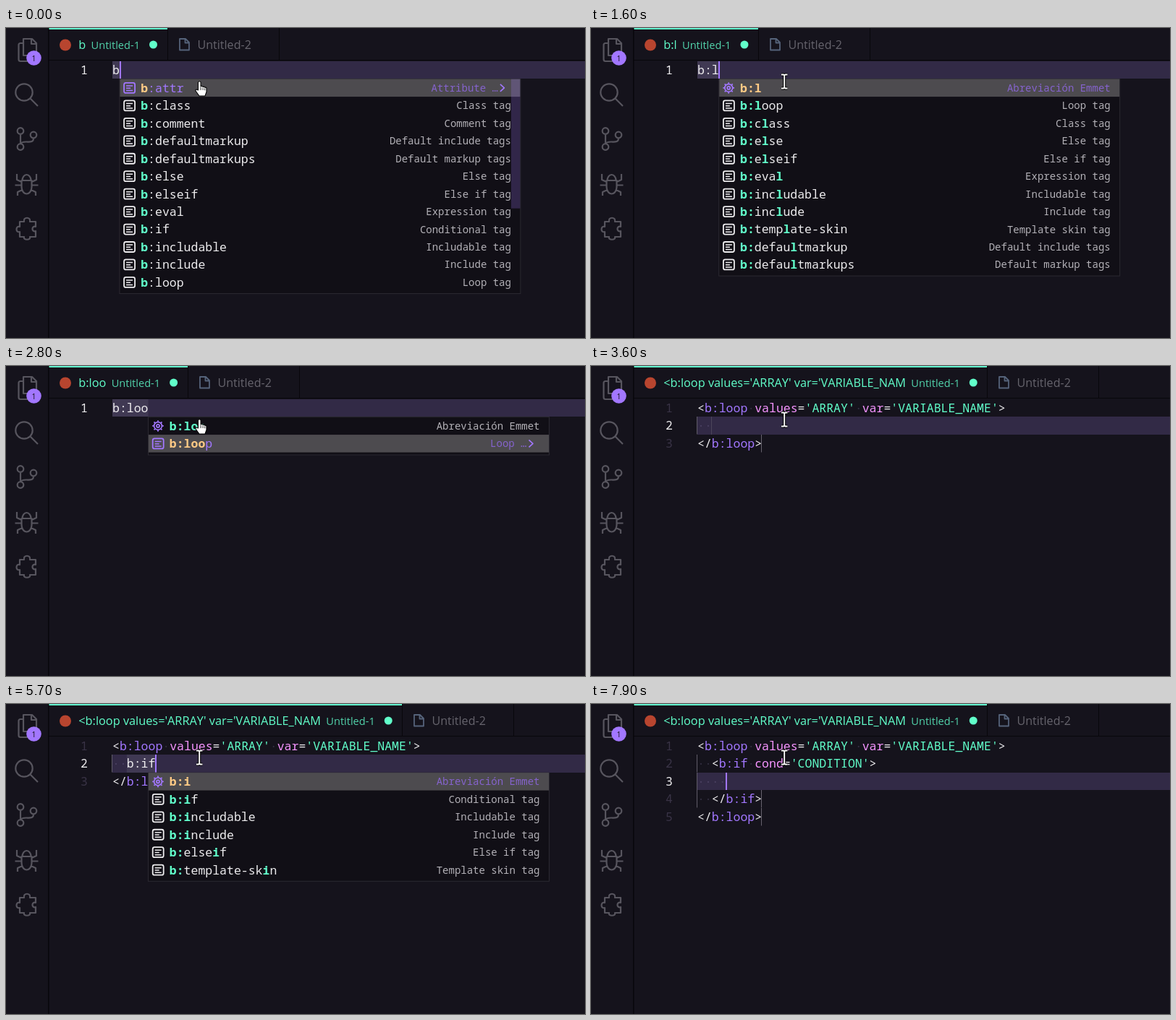
An HTML page with a canvas for the animation above (8000 ms loop, 800x429 px).

```html
<!DOCTYPE html>
<html lang="en">
<head>
<meta charset="utf-8">
<title>Tag completion</title>
<style>
html, body { margin: 0; width: 100%; height: 100%; overflow: hidden; background: #15131c; }
canvas { display: block; width: 800px; height: 429px; }
</style>
</head>
<body>
<canvas id="stage" width="800" height="429"></canvas>
<script>
const ctx = document.getElementById('stage').getContext('2d');
const LOOP = 8000, LEFT = 147, TOP = 45.7, LINE = 24.45, CHAR = 9.9;
const C = {
  bg: '#15131c', line: '#322a46', popup: '#110f16', pick: '#4d4b4f',
  white: '#edecee', green: '#61ffca', purple: '#a277ff', orange: '#ffca85',
  pink: '#f694ff', icon: '#57555e', label: '#b3b1b7', dim: '#393346'
};
const MONO = '"Noto Sans Mono", "DejaVu Sans Mono", monospace';
const SANS = '"Open Sans", "Noto Sans", sans-serif';
const CODE = '500 16.5px ' + MONO, BOLD = 'bold 16.5px ' + MONO, SMALL = '500 14px ' + MONO;

const LABELS = {
  attr: 'Attribute tag', class: 'Class tag', comment: 'Comment tag',
  defaultmarkup: 'Default include tags', defaultmarkups: 'Default markup tags',
  else: 'Else tag', elseif: 'Else if tag', eval: 'Expression tag',
  if: 'Conditional tag', includable: 'Includable tag', include: 'Include tag',
  loop: 'Loop tag', 'template-skin': 'Template skin tag'
};
const MATCHES = {
  'b': 'attr class comment defaultmarkup defaultmarkups else elseif eval if includable include loop',
  'b:l': 'loop class else elseif eval includable include template-skin defaultmarkup defaultmarkups',
  'b:lo': 'loop', 'b:loo': 'loop',
  'b:i': 'if includable include elseif template-skin',
  'b:if': 'if elseif'
};

const OPEN = "<b:loop values='ARRAY' var='VARIABLE_NAME'>", CLOSE = '</b:loop>';
const inLoop = (...body) => [OPEN, ...body, CLOSE];
const nested = inLoop("  <b:if cond='CONDITION'>", '    ', '  </b:if>');

// Each step overrides part of the state; "key" restarts the caret blink.
const STEPS = [
  [0, { lines: ['b'], row: 0, col: 1, title: 'b', pop: 'b', popCol: 1, sel: 0, more: 1, hand: 1, mark: null, key: 1 }],
  [500, { lines: ['b:'], col: 2, pop: '', hand: 0, key: 1 }],
  [600, { title: 'b:' }],
  [1400, { lines: ['b:l'], col: 3, key: 1 }],
  [1500, { title: 'b:l', pop: 'b:l', popCol: 3, more: 0 }],
  [1700, { lines: ['b:lo'], col: 4, key: 1 }],
  [1800, { title: 'b:lo', pop: 'b:lo', popCol: 4 }],
  [1900, { lines: ['b:loo'], col: 5, key: 1 }],
  [2000, { title: 'b:loo', pop: 'b:loo', popCol: 5, more: 1, hand: 1 }],
  [2600, { sel: 1 }],
  [2900, { lines: inLoop('  '), col: 21, pop: '', hand: 0, mark: [16, 21], key: 1 }],
  [3000, { col: 41, mark: [28, 41], key: 1 }],
  [3100, { title: OPEN.slice(0, 40), row: 1, col: 2, mark: null, key: 1 }],
  [3900, { key: 1 }],
  [4300, { lines: inLoop('  b'), col: 3 }],
  [4400, { key: 1 }],
  [4500, { pop: 'b', popCol: 3, sel: -1, more: 0 }],
  [5300, { lines: inLoop('  b:'), col: 4, pop: '', key: 1 }],
  [5500, { lines: inLoop('  b:i'), col: 5, key: 1 }],
  [5600, { pop: 'b:i', popCol: 5, sel: 0 }],
  [5700, { lines: inLoop('  b:if'), col: 6, key: 1 }],
  [5800, { pop: 'b:if', popCol: 6 }],
  [7200, { sel: 1, more: 1 }],
  [7600, { lines: nested, col: 23, pop: '', mark: [14, 23], key: 1 }],
  [7800, { row: 2, col: 4, mark: null, key: 1 }]
];

function stateAt(t) {
  const s = {};
  for (const [at, change] of STEPS) {
    if (at > t) break;
    Object.assign(s, change);
    if (change.key) s.keyTime = at;
  }
  s.caret = Math.floor((t - s.keyTime) / 500) % 2 === 0;
  return s;
}

const lineTop = row => Math.round(TOP + row * LINE);

function rect(x, y, w, h, color) {
  ctx.fillStyle = color;
  ctx.fillRect(x, y, w, h);
}

function text(str, x, y, color, font, align = 'left') {
  ctx.font = font;
  ctx.fillStyle = color;
  ctx.textAlign = align;
  ctx.fillText(str, x, y);
  return ctx.measureText(str).width;
}

function disc(x, y, r, color) {
  ctx.fillStyle = color;
  ctx.beginPath();
  ctx.arc(x, y, r, 0, 7);
  ctx.fill();
}

function stroke(d, color, width, x = 0, y = 0) {
  ctx.save();
  ctx.translate(x, y);
  ctx.strokeStyle = color;
  ctx.lineWidth = width;
  ctx.lineJoin = 'round';
  ctx.stroke(new Path2D(d));
  ctx.restore();
}

const ring = (x, y, r) => `M${x + r} ${y}a${r} ${r} 0 1 0 ${-2 * r} 0a${r} ${r} 0 1 0 ${2 * r} 0`;

const SIDE_ICONS = [
  'M24 15h12l6 6v17h-18zM35 15v7h7M24 21h-4q-2.5 0-2.5 2.5v20q0 2.5 2.5 2.5h13q2.5 0 2.5-2.5v-5.5',
  ring(25, 89, 11.7) + 'M33.5 97.5l10.5 10.5',
  ring(20, 142.5, 4.3) + ring(38, 148, 4.3) + ring(20, 164.5, 4.3) +
    'M20 147v13M38 152.5c0 6-5 5-10 5q-7 0-8 3',
  'M21.5 211h14v9a7 9.5 0 0 1-14 0zM22.5 211a6 8 0 0 1 12 0' +
    'M21.5 213l-6.5-3v-8M35.5 213l6.5-3v-8M21.5 217.5h-9M35.5 217.5h9M22.5 224l-6.5 3v5M34.5 224l6.5 3v5',
  'M19 268h6c-2-7 10-7 8 0h8v7c-6-2-6 8 0 6v8h-8c2 5-10 5-8 0h-6v-7c-6 2-6-9 0-7z'
];

function drawSidebar() {
  rect(58, 0, 1.5, 429, '#08070b');
  SIDE_ICONS.forEach(d => stroke(d, C.icon, 2.2));
  disc(38.5, 41.5, 10.3, C.purple);
  text('1', 38.5, 45.5, C.bg, '10.5px ' + SANS, 'center');
}

function drawTabs(title) {
  const font = '500 16.3px ' + SANS, y = 28.5;
  const nameX = 100.3 + text(title, 100.3, y, C.green, font) + 7.3;
  const nameW = text('Untitled-1', nameX, y, '#52d3ab', '14.6px ' + SANS);
  const dot = nameX + nameW + 18.5, end = Math.round(dot + 19);
  disc(82, 23.5, 8, '#b8452f');
  disc(dot, 23, 5.5, C.green);
  rect(59, 0, end - 59, 2, C.green);
  rect(end, 0, 1, 44, '#08070b');
  rect(59, 44, 741, 1, '#08070b');
  rect(end + 154, 0, 1, 44, '#08070b');
  stroke('M1 1h8l5 5v10.5h-13zM8.5 1v5.5h5.5', '#55637a', 1.8, end + 16, 14);
  text('Untitled-2', end + 41.5, y, '#66646d', '16.1px ' + SANS);
}

function tokenColor(token) {
  if (token[0] === "'") return C.green;
  if (token.startsWith('b:')) return C.purple;
  return /\w/.test(token) ? C.pink : C.white;
}

function drawLine(str, y) {
  const markup = str.includes('<');
  let x = LEFT;
  for (const token of str.match(/'[^']*'|b:\w*|\w+|\s+|[^\s\w']/g) || []) {
    const space = token[0] === ' ';
    const color = space ? 'rgba(162,150,200,.22)' : markup ? tokenColor(token) : C.white;
    x += text(space ? '·'.repeat(token.length) : token, x, y, color, CODE);
  }
}

function drawEditor(s) {
  const curY = lineTop(s.row), curH = lineTop(s.row + 1) - curY, last = s.lines.length - 1;
  const current = s.lines[s.row], word = current.trim();
  rect(LEFT, curY, 800 - LEFT, curH, C.line);
  if (word && !word.includes('<')) {
    rect(LEFT + current.indexOf('b') * CHAR, curY, word.length * CHAR, curH, 'rgba(255,255,255,.07)');
  }
  if (s.mark) {
    const [from, to] = s.mark;
    rect(LEFT + from * CHAR, curY, (to - from) * CHAR, curH, 'rgba(162,119,255,.3)');
  }
  s.lines.forEach((str, i) => {
    const y = lineTop(i), base = TOP + i * LINE + 18;
    text(i + 1, 113, base, i === s.row ? C.white : C.dim, CODE, 'right');
    drawLine(str, base);
    if (i > 0 && i < last) rect(LEFT - 1, y, 1, LINE, '#5f5b68');
    if (str.includes('</')) rect(235, y, 1, LINE, '#66626e');
  });
  if (!word && last === 2) rect(LEFT + 2 * CHAR - 0.8, curY, 1, curH, '#4c455a');
  if (s.caret) rect(Math.round(LEFT + s.col * CHAR - 0.3), curY, 2, curH, C.purple);
}

function drawTagIcon(x, y, color) {
  ctx.strokeStyle = color;
  ctx.lineWidth = 1.8;
  ctx.beginPath();
  ctx.roundRect(x - 7.5, y - 7, 15, 14, 2.5);
  ctx.stroke();
  stroke('M-4.5-3h9M-4.5 .3h6M-4.5 3.6h9', color, 1.5, x, y);
}

function drawGear(x, y) {
  let d = ring(0, 0, 5.4) + ring(0, 0, 2);
  for (let i = 0; i < 8; i++) {
    const a = i * Math.PI / 4, c = Math.cos(a), n = Math.sin(a);
    d += `M${c * 5.4} ${n * 5.4}L${c * 7.8} ${n * 7.8}`;
  }
  stroke(d, C.purple, 1.7, x, y);
}

function drawMatch(name, query, x, y, plain, hit) {
  let q = 0;
  for (const ch of name) {
    const on = ch === query[q];
    if (on) q++;
    x += text(ch, x, y, on ? hit : plain, on ? BOLD : CODE);
  }
}

function drawPopup(s) {
  const x = LEFT + s.popCol * CHAR, y = TOP + (s.row + 1) * LINE + 0.5, width = 554;
  const rows = MATCHES[s.pop].split(' ').map(tag => ['b:' + tag, LABELS[tag]]);
  const emmet = s.pop.length > 1;
  if (emmet) rows.unshift([s.pop, 'Abreviación Emmet']);
  const height = rows.length * LINE + 3.5;
  rect(x - 0.5, y - 0.5, width + 1, height + 1, '#2b2931');
  rect(x + 0.5, y + 0.5, width - 1, height - 1, C.popup);

  rows.forEach(([name, label], i) => {
    const rowY = y + i * LINE, mid = rowY + 12.3, on = i === s.sel;
    if (on) rect(x + 0.5, rowY, width - 1, LINE, C.pick);
    if (emmet && i === 0) drawGear(x + 13.5, mid);
    else drawTagIcon(x + 13.7, mid, on ? C.purple : C.white);
    drawMatch(name, s.pop, x + 29.3, rowY + 18.2, on ? C.purple : C.white, on ? C.orange : C.green);
    const cut = on && s.more;
    text(cut ? label.slice(0, -3) + '…' : label, x + (cut ? 523 : 541), rowY + 17.3,
      on ? '#8563cd' : C.label, SMALL, 'right');
    if (cut) stroke('M0-5l5.5 5l-5.5 5', C.purple, 1.6, x + 526, mid);
  });
  if (rows.length > 11) rect(x + 541, y, 12.5, 179, 'rgba(162,119,255,.22)');
}

function drawMouse(hand) {
  if (!hand) {
    const beam = 'M263 64.5h3l1.2 1.2l1.2-1.2h3M267.2 65.5v17M263 83.5h3l1.2-1.2l1.2 1.2h3';
    stroke(beam, '#000', 4);
    stroke(beam, '#fff', 1.9);
    return;
  }
  const shape = 'M265.5 86V75q1.8-2.6 3.6 0v6q2-1.4 3 .5q2-1 2.6.8q2-.6 2.3 1.2v5l-2 5.5h-8l-5-7q-.3-2.4 1.8-1.8z';
  ctx.fillStyle = '#fff';
  ctx.fill(new Path2D(shape));
  stroke(shape, '#000', 1.1);
  stroke('M269.1 82v4M272.1 82.5v3.5M274.7 83.3v3', '#000', .8);
}

function draw(now) {
  const s = stateAt(now % LOOP);
  ctx.fontKerning = 'none';
  rect(0, 0, 800, 429, C.bg);
  drawEditor(s);
  drawTabs(s.title);
  drawSidebar();
  if (s.pop) drawPopup(s);
  drawMouse(s.hand);
}

const start = performance.now();
function tick() {
  draw(performance.now() - start);
  requestAnimationFrame(tick);
}
tick();
</script>
</body>
</html>
```
